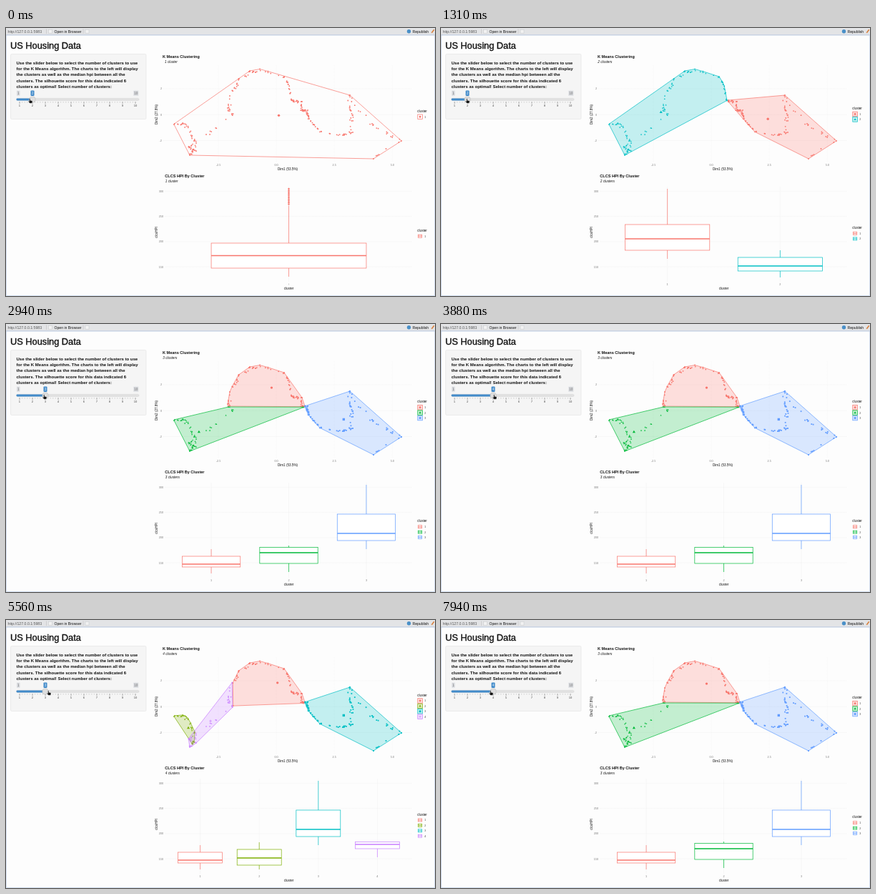
Write an HTML page that moves like this. It is 600 by 375 pixels and loops after 8 s.

```html
<!DOCTYPE html>
<html lang="en">
<head>
<meta charset="utf-8">
<title>US Housing Data</title>
<style>
html, body { margin: 0; width: 100%; height: 100%; overflow: hidden; background: #fdfdfd; }
svg { display: block; width: 100vw; height: 100vh; }
text { font-family: "Liberation Sans", Arial, sans-serif; }
</style>
</head>
<body>
<svg id="stage" viewBox="0 0 600 375"></svg>
<script>
const LOOP = 8000;
const stage = document.getElementById("stage");

function el(parent, tag, attrs = {}, content) {
  const node = document.createElementNS("http://www.w3.org/2000/svg", tag);
  for (const key in attrs) node.setAttribute(key, attrs[key]);
  if (content !== undefined) node.textContent = content;
  return parent.appendChild(node);
}
const text = (parent, x, y, size, content, attrs = {}) =>
  el(parent, "text", { x, y, "font-size": size, fill: "#111", ...attrs }, content);
const rect = (parent, x, y, width, height, fill, attrs = {}) =>
  el(parent, "rect", { x, y, width, height, fill, ...attrs });
const line = (parent, x1, y1, x2, y2, stroke, width = 0.7) =>
  el(parent, "line", { x1, y1, x2, y2, stroke, "stroke-width": width });
const outline = (stroke, width = 0.7) => ({ stroke, "stroke-width": width });
const MID = { "text-anchor": "middle" };
const END = { "text-anchor": "end" };
const BOLD = { "font-weight": "bold" };
const TICK = { fill: "#777" };

// ---- Window bar, heading and panel ----
rect(stage, 0, 0, 600, 375, "#fdfdfd");
rect(stage, 0, 0, 600, 9.5, "#e3e4e6");
line(stage, 0, 9.7, 600, 9.7, "#b4c0d2");
rect(stage, 0.3, 10, 599.4, 364.6, "none", outline("#bfd0e8"));
text(stage, 2.5, 6.6, 5.2, "http://127.0.0.1:5983", { fill: "#555" });
text(stage, 67.5, 6.5, 5.1, "Open in Browser");
text(stage, 568.5, 6.5, 5.1, "Republish");
for (const x of [56.5, 108]) {
  line(stage, x, 1.5, x, 8, "#c4c4c4");
  rect(stage, x + 3, 2.2, 5, 5, "#f2f2f2", outline("#cacccf", 0.6));
}
el(stage, "circle", { cx: 563.5, cy: 4.7, r: 2.7, fill: "#4a90c8" });
line(stage, 598.7, 2.3, 595.3, 6.8, "#d9813f", 1.6);

text(stage, 6, 29.3, 12.8, "US Housing Data", outline("#111", 0.35));
rect(stage, 6.5, 36.5, 189.5, 91, "#f5f5f5", { rx: 1.5, ...outline("#e6e6e6") });
[
  "Use the slider below to select the number of clusters to use",
  "for the K Means algorithm. The charts to the left will display",
  "the clusters as well as the median hpi between all the",
  "clusters. The silhouette score for this data indicated 6",
  "clusters as optimal! Select number of clusters:"
].forEach((row, i) => text(stage, 14.5, 50.6 + i * 8.4, 6, row, BOLD));

// ---- Slider ----
const sliderX = k => 19 + 18 * (k - 1);
function badge(parent, x, width, label, fill, color) {
  rect(parent, x - width / 2, 87.6, width, 7.4, fill, { rx: 1 });
  return text(parent, x, 93.1, 4.6, label, { ...MID, fill: color });
}
badge(stage, 17.2, 4.6, 1, "#dcdee2", "#666");
badge(stage, 181.8, 7.2, 10, "#dcdee2", "#666");
rect(stage, 14.5, 98.4, 171.5, 3, "#e2e2e2", { rx: 1.5, ...outline("#ccc", 0.4) });
for (let i = 0; i <= 45; i++) {
  const major = i % 5 === 0, x = sliderX(1 + i / 5);
  line(stage, x, 103, x, major ? 106 : 104.5, major ? "#555" : "#aaa", 0.5);
  if (major) text(stage, x, 110.2, 4.1, 1 + i / 5, { ...MID, fill: "#444" });
}
const bar = rect(stage, 14.5, 98.4, 20, 3, "#428bca", { rx: 1.3 });
const knob = el(stage, "g");
const knobLabel = badge(knob, 0, 5, "", "#428bca", "#fff");
el(knob, "circle", { cx: 0, cy: 100, r: 4.1, fill: "#dedede", ...outline("#bbb", 0.6) });

// ---- Chart titles and axes ----
const sideLabel = (y, label) =>
  text(stage, 0, 0, 4.6, label, { ...MID, transform: `translate(212.3 ${y}) rotate(-90)` });
text(stage, 219, 42.4, 5.55, "K Means Clustering", BOLD);
text(stage, 222.3, 209, 5.55, "CLCS HPI By Cluster", BOLD);
text(stage, 394, 199.4, 4.6, "Dim1 (53.5%)", MID);
text(stage, 395.5, 365.8, 4.6, "cluster", MID);
sideLabel(121, "Dim2 (27.8%)");
sideLabel(286, "clcsHPI");

const grid = el(stage, "g", { "stroke-dasharray": "1 1" });
function rows(labels, x, top, step) {
  labels.forEach((label, i) => {
    const y = top + step * i;
    line(grid, x, y, 568, y, "#e6e6e6", 0.5);
    text(stage, x - 2, y + 1.4, 3.8, label, { ...END, ...TICK });
  });
}
rows([2, 0, -2], 220, 85, 36.2);
rows([300, 250, 200, 150], 222, 228.3, 35.3);
["-2.5", "0.0", "2.5", "5.0"].forEach((label, i) => {
  const x = 297 + 81.1 * i;
  line(grid, x, 52, x, 188, "#eee", 0.5);
  text(stage, x, 193, 3.8, label, { ...MID, ...TICK });
});

// ---- Scatter data: points strewn along one winding line, pulled slightly inwards ----
const trail = ("235,135 248,134 263,158 261,173 257,178 256,166 280,149 316,121 311,116 310,112 " +
  "313,95 326,71 341,60 355,57.5 389,68 394,76 400,101 402,101 414,103 414,115 422,115 " +
  "424,127 441,145 471,150 485,146 485,122 481,94 512,134 553,158 514,183")
  .split(" ").map(pair => pair.split(",").map(Number));
let seed = 7;
const random = () => (seed = seed * 16807 % 2147483647) / 2147483647;
function strewn() {
  const u = random() ** 1.1 * (trail.length - 1), i = Math.floor(u);
  const pull = random() * 0.04;
  return [0, 1].map(axis => {
    const p = trail[i][axis] + (trail[i + 1][axis] - trail[i][axis]) * (u - i);
    return p + ([385, 135][axis] - p) * pull + (random() - 0.5) * 2.4;
  });
}
const points = [...trail, ...Array.from({ length: 225 }, strewn)];

function convexHull(cloud) {
  const sorted = [...cloud].sort((a, b) => a[0] - b[0] || a[1] - b[1]);
  const chain = list => {
    const hull = [];
    for (const p of list) {
      while (hull.length > 1) {
        const [a, b] = hull.slice(-2);
        if ((b[0] - a[0]) * (p[1] - a[1]) - (b[1] - a[1]) * (p[0] - a[0]) > 0) break;
        hull.pop();
      }
      hull.push(p);
    }
    return hull.slice(0, -1);
  };
  return [...chain(sorted), ...chain(sorted.reverse())];
}
const mean = (cloud, axis) => cloud.reduce((sum, p) => sum + p[axis], 0) / cloud.length;

// ---- Cluster models; boxes hold upper quartile, median and lower quartile ----
const RED = "#f8766d", TEAL = "#00bfc4";
const LOW = [325, 336, 340], HIGH = [266, 293, 303];
const models = [
  { colors: [RED], boxes: [[301, 318.5, 336]], pick: () => 0 },
  { colors: [RED, TEAL], boxes: [[275, 295, 311], [321, 333, 340]], pick: x => x > 401 ? 0 : 1 },
  {
    colors: [RED, "#00ba38", "#619cff"], boxes: [LOW, [312.5, 320, 335], HIGH],
    pick: (x, y) => x > 418 ? 2 : x > 309 && y < 116 ? 0 : 1
  },
  {
    colors: [RED, "#7cae00", TEAL, "#c77cff"], boxes: [LOW, [321, 333, 343], HIGH, [310.5, 314, 320]],
    pick: (x, y) => x > 418 ? 2 : x > 317 ? 0 : x > 264 || (y > 164 && x < 260) ? 3 : 1
  }
];

function marker(parent, kind, x, y, r, color) {
  const d = [
    `M${x - r} ${y}a${r} ${r} 0 1 0 ${2 * r} 0a${r} ${r} 0 1 0 ${-2 * r} 0z`,
    `M${x} ${y - 1.3 * r}l${1.2 * r} ${2.1 * r}h${-2.4 * r}z`,
    `M${x - r} ${y - r}h${2 * r}v${2 * r}h${-2 * r}z`,
    `M${x - r} ${y}h${2 * r}M${x} ${y - r}v${2 * r}`
  ][kind];
  el(parent, "path", { d, fill: color, ...outline(color, kind === 3 ? 0.7 : 0) });
}

function drawBox(parent, x, halfWidth, [q3, median, q1], color) {
  const top = q3 > 305 ? Math.max(310, q3 - 10) : Math.max(225, q3 - 1.5 * (q1 - q3));
  line(parent, x, 222, x, 355, "#f0f0f0", 0.5);
  line(parent, x, top, x, Math.min(349, q1 + 12), color);
  rect(parent, x - halfWidth, q3, 2 * halfWidth, q1 - q3, "#fff", outline(color));
  line(parent, x - halfWidth, median, x + halfWidth, median, color, 1.4);
}

function drawModel({ colors, boxes, pick }) {
  const group = el(stage, "g");
  const k = colors.length, single = k === 1;
  const shade = { "fill-opacity": single ? 0 : 0.23 };
  const subtitle = `${k} cluster${single ? "" : "s"}`;
  text(group, single ? 222 : 219.3, 48.8, 4.7, subtitle, { "font-style": "italic" });
  text(group, 222.8, 215.6, 4.7, subtitle, { "font-style": "italic" });

  const titleY = 120 - 3.75 * k;
  for (const y of [titleY, titleY + 167]) text(group, 575.3, y + 1.5, 4.6, "cluster");

  const spacing = 347 / (k + 0.2);
  colors.forEach((color, i) => {
    const cloud = points.filter(p => pick(...p) === i);
    el(group, "polygon", { points: convexHull(cloud).join(" "), fill: color, ...shade, ...outline(color) });
    for (const [x, y] of cloud) marker(group, i, x, y, 0.9, color);
    marker(group, i, mean(cloud, 0), mean(cloud, 1), 1.7, color);

    const y = titleY + 8 + 7.4 * i, low = y + 167;
    rect(group, 575.8, y - 3.3, 6.6, 6.6, color, { ...shade, ...outline(color) });
    marker(group, i, 579.1, y, 1.4, color);
    rect(group, 576.5, low - 2, 5.2, 4, "#fff", outline(color));
    line(group, 576.5, low, 581.7, low, color, 0.9);
    for (const labelY of [y, low]) text(group, 585.3, labelY + 1.4, 3.8, i + 1, { fill: "#444" });

    const x = 395.5 + spacing * (i - (k - 1) / 2);
    drawBox(group, x, spacing * 0.375, boxes[i], color);
    if (!single) text(group, x, 360, 3.8, i + 1, { ...MID, ...TICK });
  });
  if (single) {
    line(group, 395.5, 357.5, 395.5, 359.5, "#999", 0.5);
    for (let y = 225; y < 248; y += 2.4) marker(group, 0, 395.5, y, 1.2, RED);
  }
  return group;
}
const charts = models.map(drawModel);

// ---- Pointer ----
const hand = el(stage, "path", {
  d: "M-1.5 -3.3q.8-.8 1.4 0v2.4l2.6.6q1 .3.8 1.4l-.6 2.6h-3.6l-2.3-2.9q.3-1 1.7 0z",
  fill: "#111", ...outline("#fff", 0.4)
});

// ---- Motion: the knob snaps to the dragged pointer, the charts follow later ----
const drags = [[0, 37], [1600, 54], [3200, 75], [4850, 60], [7250, 70]];
const DRAG_TIME = 600, CHART_DELAY = 760;

function pointerX(t) {
  return drags.reduce((x, [start, goal]) => {
    const u = Math.min(1, Math.max(0, (t - start) / DRAG_TIME));
    return x + (goal - x) * u * u * (3 - 2 * u);
  }, 34);
}
const sliderValue = t => Math.round((pointerX(t) - 19) / 18) + 1;

function render(now) {
  const t = now % LOOP;
  hand.setAttribute("transform", `translate(${pointerX(t)} 102) scale(.9)`);

  const value = sliderValue(t);
  knob.setAttribute("transform", `translate(${sliderX(value)} 0)`);
  knobLabel.textContent = value;
  bar.setAttribute("width", sliderX(value) - 14.5);

  const shown = t < CHART_DELAY ? 1 : sliderValue(t - CHART_DELAY);
  charts.forEach((chart, i) => chart.setAttribute("display", i + 1 === shown ? "inline" : "none"));
}

const started = performance.now();
function frame() {
  render(performance.now() - started);
  requestAnimationFrame(frame);
}
frame();
</script>
</body>
</html>
```
